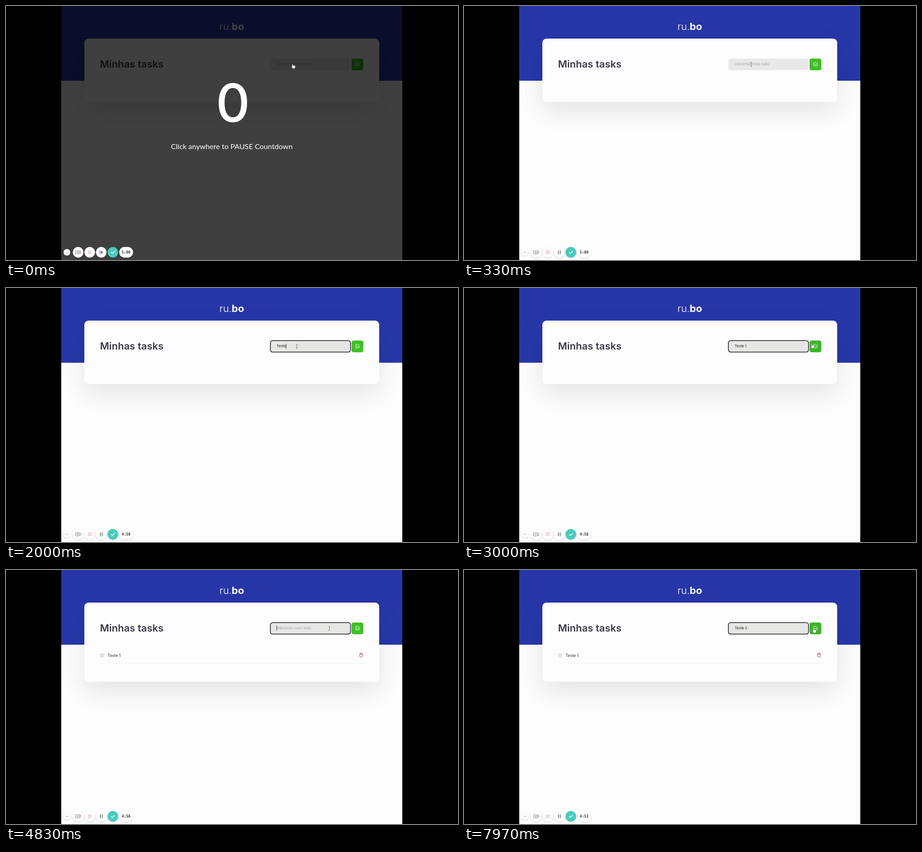
Animation of 998 by 561 pixels, one loop 8 s. Source, as an HTML page:

```html
<!DOCTYPE html>
<html lang="pt">
<head>
<meta charset="utf-8">
<title>Minhas tasks</title>
<style>
  html, body { margin: 0; width: 100%; height: 100%; overflow: hidden; background: #000; }
  svg { display: block; width: 100vw; height: 100vh; }
  text { font-family: Inter, sans-serif; white-space: pre; }
  .line { fill: none; stroke-linecap: round; stroke-linejoin: round; }
  .timer { font: bold 8px "DejaVu Sans Mono", monospace; }
  .hint { font: 16.2px Lato, sans-serif; }
</style>
</head>
<body>
<svg viewBox="0 0 998 561">
  <defs>
    <clipPath id="page"><rect x="122" width="753" height="561"/></clipPath>
    <filter id="blur" x="-50%" y="-100%" width="200%" height="300%"><feGaussianBlur stdDeviation="28"/></filter>
    <filter id="lift" x="-20%" y="-50%" width="140%" height="200%"><feDropShadow dx="0" dy="1" stdDeviation="1.5" flood-opacity=".22"/></filter>
  </defs>
  <rect width="998" height="561"/>
  <g clip-path="url(#page)">
    <rect x="122" width="753" height="561" fill="#fdfdfd"/>
    <rect x="122" width="753" height="165" fill="#2737a8"/>
    <rect id="shadow" x="173" y="92" width="651" rx="9" opacity=".1" filter="url(#blur)"/>
    <text x="498.5" y="53" font-size="22" fill="#fff" text-anchor="middle"><tspan font-weight="300">ru.</tspan><tspan font-weight="700">bo</tspan></text>
    <rect id="card" x="173" y="72" width="651" rx="9" fill="#fdfdfd"/>
    <text x="207.5" y="136" font-size="22" font-weight="600" fill="#3a3a4b">Minhas tasks</text>

    <rect id="field" x="583.7" y="116.2" width="177" height="25.4" rx="5" stroke="#151515"/>
    <text id="placeholder" x="597.5" y="131.2" font-size="8" fill="#a4a4ae">Adicionar novo todo</text>
    <text id="typed" x="597.5" y="131.2" font-size="8" fill="#222" xml:space="preserve"></text>
    <rect id="caret" y="123" width=".9" height="11" fill="#222"/>

    <rect id="button" x="763" y="116" width="26" height="26" rx="4.5"/>
    <path class="line" d="M779.8 128v3.2q0 1-1 1h-5.6q-1 0-1-1v-5.6q0-1 1-1h4M774.3 128l1.8 1.8 4.2-4.6" stroke="#fff"/>

    <g id="task">
      <rect x="207.5" y="184" width="9.5" height="9.5" rx="2" fill="#e3e3e9"/>
      <text x="224" y="192" font-size="8.9" fill="#333340">Teste 1</text>
      <path class="line" d="M780.3 185.5h7.4M782.5 185.2v-1.4h3v1.4M781.2 185.7v5.6q0 1 1 1h3.6q1 0 1-1v-5.6" stroke="#b8325c"/>
      <path d="M208 205.5h581" stroke="#ecece4" stroke-dasharray="3 1"/>
    </g>

    <g id="overlay">
      <rect x="122" width="753" height="561" opacity=".75"/>
      <text x="501" y="256" font-size="117" font-weight="500" fill="#fff" text-anchor="middle">0</text>
      <text class="hint" x="498.5" y="316" fill="#fff" text-anchor="middle">Click anywhere to PAUSE Countdown</text>
    </g>

    <g id="ibeam"><path class="line" d="M-1.3-4.5Q0-4.5 0-3.5V3.5Q0 4.5-1.3 4.5M1.3-4.5Q0-4.5 0-3.5M0 3.5Q0 4.5 1.3 4.5" stroke="#555" stroke-width=".8"/></g>
    <g id="hand"><path d="M-2.5-4.5q1.1-1 1.8.3l.5 2.5 1.2-.4 1 .6 1-.2.8.7q1-.2 1 1l-.2 2.6-1 1.4v1.2h-4.8l-.3-1.2-2.3-2.9q-.4-1.2.9-1l1.1.9z" fill="#fff" stroke="#333" stroke-width=".5"/></g>

    <g filter="url(#lift)" fill="#fff">
      <circle cx="134.5" cy="544" r="7.3"/>
      <circle cx="159.3" cy="544" r="11.7"/>
      <circle cx="184.9" cy="544" r="11.7"/>
      <circle cx="210.4" cy="544" r="11.7"/>
      <circle cx="235.9" cy="544" r="11.7" fill="#48cbbd"/>
      <rect x="250" y="532.3" width="30.5" height="23.4" rx="11.7"/>
    </g>
    <path class="line" d="M132.4 544h.01M134.6 544h.01M136.8 544h.01" stroke="#666" stroke-width="1.3"/>
    <g class="line" stroke="#858585">
      <path d="M154 540.3h7.5v7.4H154zM161.5 543l3.5-2.2v6.4l-3.5-2.2M156 544h3.5M157.75 542.2v3.6"/>
    </g>
    <path class="line" d="M181.3 540.4l7.2 7.2M188.5 540.4l-7.2 7.2" stroke="#e88a9d" stroke-width="1.3"/>
    <path id="pause" d="M208.4 539.8v8.4M212.6 539.8v8.4" stroke="#85858c" stroke-width="2"/>
    <g id="play"><path d="M207.3 539.8v8.4" stroke="#85858c" stroke-width="1.6"/><path d="M209.4 539.8l5.8 4.2-5.8 4.2z" fill="#85858c"/></g>
    <path class="line" d="M232.2 544.2l2.7 2.6 5-5.4" stroke="#fff" stroke-width="1.5"/>
    <text id="timer" class="timer" x="265.2" y="547" fill="#34343c" text-anchor="middle"></text>
  </g>
</svg>
<script>
const LOOP = 8000, RESUME = 30, FADE = 120, ADDED = 3200;
const el = id => document.getElementById(id);
const show = (id, on) => el(id).setAttribute('visibility', on ? 'visible' : 'hidden');
const set = (id, name, value) => el(id).setAttribute(name, value);
const clamp = v => Math.max(0, Math.min(1, v));
const ease = v => v * v * (3 - 2 * v);

// Each session: focus time, blur time, text and the time of each keystroke.
const sessions = [
  { from: 600, to: ADDED, text: 'Teste 1', keys: [1480, 1600, 1720, 1840, 1950, 2150, 2350] },
  { from: 4600, to: LOOP, text: 'Teste 2', keys: [6030, 6120, 6200, 6390, 6400, 6600, 7240] }
];

// Pointer stops: time, x, y.
const stops = [
  [0, 634, 133], [30, 634, 129], [350, 634, 129], [600, 642, 129], [2670, 642, 129],
  [3050, 775, 128], [3850, 775, 128], [4400, 714, 129], [7480, 714, 129], [7800, 773, 134]
];

function pointerAt(t) {
  const next = stops.findIndex(s => s[0] > t);
  if (next < 0) return stops.at(-1).slice(1);
  const [t0, x0, y0] = stops[next - 1], [t1, x1, y1] = stops[next];
  const k = ease((t - t0) / (t1 - t0));
  return [x0 + (x1 - x0) * k, y0 + (y1 - y0) * k];
}

function drawField(t) {
  const session = sessions.find(s => t >= s.from && t < s.to);
  const pressed = session ? session.keys.filter(k => k <= t) : [];
  const text = session ? session.text.slice(0, pressed.length) : '';
  el('typed').textContent = text;
  show('placeholder', !text);
  set('field', 'stroke-width', session ? 1.5 : 0);
  set('field', 'fill', session ? '#e6e6e5' : '#e8e8e9');

  const lastEvent = session ? pressed.at(-1) ?? session.from : 0;
  show('caret', session && (t - lastEvent) % 1000 < 500);
  set('caret', 'x', 597.3 + (text ? el('typed').getComputedTextLength() : 0));
}

function drawPointer(t) {
  const [x, y] = pointerAt(t);
  const onButton = x > 763;
  const hand = onButton || t < RESUME;
  show('hand', hand);
  show('ibeam', !hand);
  set('hand', 'transform', `translate(${x} ${y})`);
  set('ibeam', 'transform', `translate(${x} ${y})`);
  set('button', 'fill', onButton ? '#3fb42a' : '#43bf2b');
}

function draw(t) {
  const added = t >= ADDED;
  const height = added ? 175 : 140;
  set('card', 'height', height);
  set('shadow', 'height', height);
  show('task', added);
  drawField(t);
  drawPointer(t);

  set('overlay', 'opacity', 1 - clamp((t - RESUME) / FADE));
  show('play', t < RESUME);
  show('pause', t >= RESUME);
  const left = 300 - Math.max(0, Math.floor((t - 3) / 1000));
  el('timer').textContent = `${Math.floor(left / 60)}:${String(left % 60).padStart(2, '0')}`;
}

const start = performance.now();
function tick() {
  draw((performance.now() - start) % LOOP);
  requestAnimationFrame(tick);
}
tick();
</script>
</body>
</html>
```
